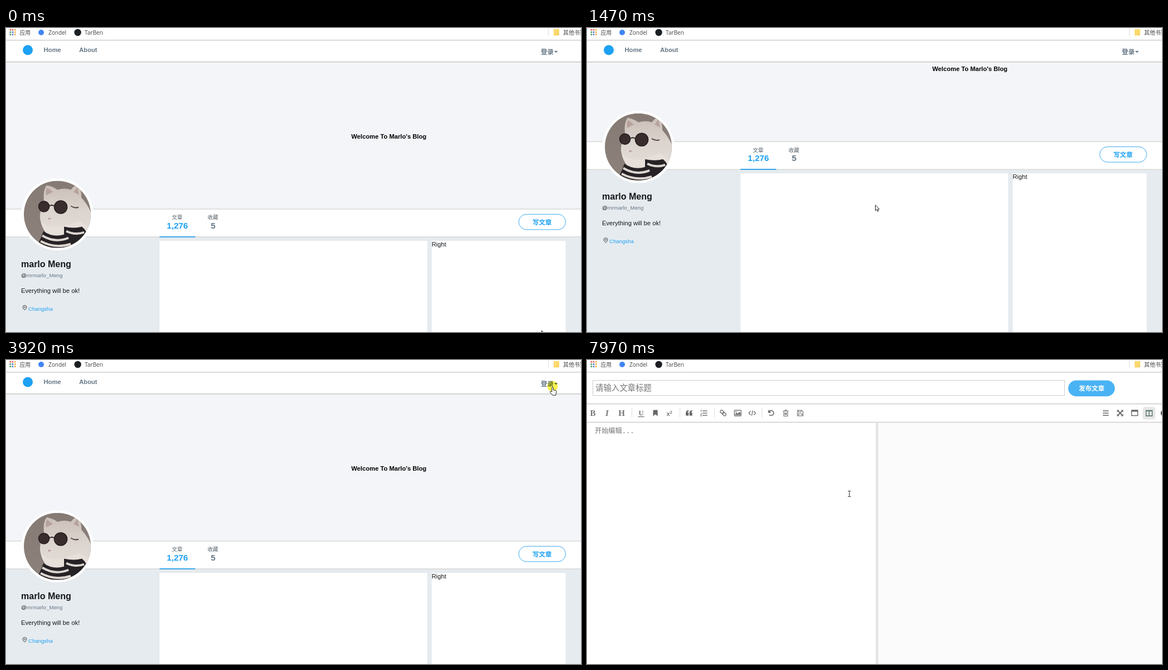
Recreate the animation shown at these times as an HTML page. Size 1030 by 544 pixels, loop 8000 ms.

```html
<!DOCTYPE html>
<html lang="zh">
<head>
<meta charset="utf-8">
<title>Blog</title>
<style>
html, body { margin: 0; width: 100%; height: 100%; overflow: hidden; background: #fff; }
svg { display: block; }
text { font-family: "Liberation Sans", Arial, "Noto Sans CJK SC", "Noto Sans CJK", sans-serif; font-size: 11.2px; fill: #14171a; white-space: pre; }
.b { font-weight: 700; }
.mark { font-family: "Open Sans", "Noto Sans CJK SC", "Noto Sans CJK", sans-serif; font-size: 10px; fill: #444; }
.cjk { font-family: "Noto Sans CJK SC", "Noto Sans CJK", sans-serif; }
.gray { fill: #657786; }
.blue { fill: #1da1f2; }
.hint { fill: #757575; }
.s { font-size: 9.6px; }
.num { font-size: 15.2px; font-weight: 700; text-anchor: middle; }
.serif { font-family: "Liberation Serif", Tinos, serif; font-weight: 700; font-size: 15px; fill: #757575; text-anchor: middle; }
.line { fill: none; stroke: #757575; stroke-width: 1.4; }
.ptr { fill: #fff; stroke: #222; stroke-width: 1; stroke-linejoin: round; }
#press { mix-blend-mode: multiply; }
</style>
</head>
<body>
<svg width="1030" height="544" viewBox="0 0 1030 544">
<defs>
  <clipPath id="round"><circle r="60"/></clipPath>
  <linearGradient id="wall" x2="0" y2="1"><stop stop-color="#857a74"/><stop offset="1" stop-color="#8c817b"/></linearGradient>
  <linearGradient id="fur" x2="0" y2="1"><stop stop-color="#c9beb7"/><stop offset=".5" stop-color="#dcd4ce"/><stop offset="1" stop-color="#e4ddd8"/></linearGradient>
  <filter id="soft" x="-10%" y="-10%" width="120%" height="120%"><feDropShadow dx="0" dy="1" stdDeviation="1.2" flood-opacity=".28"/></filter>
  <g id="cat" clip-path="url(#round)">
    <rect x="-60" y="-60" width="120" height="120" fill="url(#wall)"/>
    <path d="M-24-24Q-26-44-19-52Q-8-50 0-44Q14-48 24-44Q32-54 38-54Q43-44 43-30Q54-18 60-4V36L6 40Q-22 30-30 12Q-34 0-24-24Z" fill="url(#fur)"/>
    <path d="M-20-34Q-22-44-18-48L-8-40ZM29-40L36-49L39-35Z" fill="#b5a39c"/>
    <path d="M-30 12Q-16 26 8 22L40 12L60 26V42H-10Q-26 32-30 12Z" fill="#e6dfda"/>
    <path d="M-17 6l6 1-4 3z" fill="#b39a93"/>
    <path d="M24-15q8 5 14 2" fill="none" stroke="#5b4c48" stroke-width="2"/>
    <path d="M12 22Q30 26 44 22Q54 30 54 42L48 60H-38Q-30 44-25 30Q-8 42 12 36Z" fill="#262225"/>
    <path d="M-27 38Q-4 52 20 42M-30 48Q-4 62 24 53M16 30Q32 38 48 32" fill="none" stroke="#ddd6d1" stroke-width="4"/>
    <g fill="#3a2d2e" stroke="#241b1c" stroke-width="1.5"><circle cx="-24" cy="-14" r="9.5"/><circle cx="6" cy="-13" r="11.5"/></g>
    <path d="M-14-15q4-3 8 0" fill="none" stroke="#30282a" stroke-width="2"/>
  </g>
  <g id="face"><circle r="64.5" fill="#fff"/><use href="#cat"/></g>
</defs>

<g id="page">
  <rect y="61" width="1030" height="483" fill="#f3f5f8"/>
  <text id="hello" class="b" style="fill:#000" x="618.5" y="198">Welcome To Marlo's Blog</text>
  <rect id="ground" width="1030" height="600" fill="#e6ebef"/>
  <g id="flow"><g id="view">
    <rect x="275" y="381" width="479.5" height="800" fill="#fff"/>
    <rect x="762.5" y="381" width="240" height="800" fill="#fff"/>
    <text x="762.5" y="391">Right</text>
    <text class="b" style="font-size:16px" x="27" y="428">marlo Meng</text>
    <text class="s gray" x="27" y="446"><tspan fill="#14171a">@</tspan>mrmarlo_Meng</text>
    <text x="27" y="474">Everything will be ok!</text>
    <path d="M33.5 505Q30 501.5 30 499.8A3.5 3.5 0 0 1 37 499.8Q37 501.5 33.5 505Z" fill="none" stroke="#444"/>
    <circle cx="33.5" cy="499.8" r="1.2" fill="none" stroke="#444" stroke-width=".8"/>
    <text class="s blue" x="40" y="505.5">Changsha</text>
  </g></g>
  <rect id="strip" y="61" width="1030" height="24" fill="#f3f5f8"/>
  <use id="faceLow" href="#face"/>
  <g id="bar">
    <rect width="1030" height="50" fill="#fff"/>
    <path d="M0 0H1030M0 49.8H1030" stroke="#c8c8c8"/>
    <g id="mini">
      <use href="#cat" transform="translate(47.5 26) scale(.333)"/>
      <text class="b" style="font-size:13.5px" x="75" y="21">Marlo Meng</text>
      <text class="blue" style="font-size:12px" x="75" y="39.5">@mrmarlo_meng</text>
    </g>
    <text class="s cjk" style="fill:#55606a" x="297" y="18.4">文章</text>
    <text id="n0" class="num" x="307" y="35">1,276</text>
    <text class="s cjk" style="fill:#55606a" x="361" y="18.4">收藏</text>
    <text id="n1" class="num" x="371" y="35">5</text>
    <rect id="u0" x="275" y="48.8" width="64" height="1.7" fill="#1d9bea"/>
    <rect id="u1" x="339" y="48.8" width="64" height="1.7" fill="#1d9bea"/>
    <rect x="918.5" y="9.3" width="84" height="27.5" rx="13.7" fill="#fff" stroke="#3fabee"/>
    <text class="b cjk blue" style="font-size:11.5px" x="943" y="27.5">写文章</text>
  </g>
  <use id="faceTop" href="#face"/>
  <rect y="22" width="1030" height="38" fill="#fff"/>
  <path d="M0 60.5H1030" stroke="#c4c4c4"/><path d="M0 61.5H1030" stroke="#e2e3e4"/>
  <circle cx="39" cy="39.5" r="9" fill="#1da1f2"/>
  <text class="b gray" x="67.5" y="42.6">Home</text>
  <text class="b gray" x="131" y="42.6">About</text>
  <text class="b cjk gray" style="font-size:11.6px" x="958" y="47">登录</text>
  <path d="M982 41h6.5l-3.25 3.5z" fill="#657786"/>
  <g id="login">
    <rect x="793" y="63" width="209" height="145" rx="3" fill="#fff" stroke="#d8d8d8" filter="url(#soft)"/>
    <path d="M968 64L977 58L986 64Z" fill="#fff"/>
    <rect id="user" x="806" y="80" width="185" height="24" rx="1" fill="#fff" stroke="#ccc"/>
    <text class="hint" x="810.5" y="95.5">username</text>
    <rect x="806" y="121" width="185" height="24" rx="1" fill="#fff" stroke="#ccc"/>
    <text class="hint" x="810.5" y="136.5">password</text>
    <rect x="818" y="159.5" width="160" height="28" rx="14" fill="#1da1f2"/>
    <text class="b" style="fill:#fff" x="881" y="177">Log in</text>
  </g>
</g>

<g id="editor">
  <rect y="22" width="1030" height="522" fill="#fff"/>
  <rect x="10.5" y="36.5" width="845" height="27" fill="#fff" stroke="#ccc"/>
  <text class="cjk hint" style="font-size:14.4px" x="15" y="54.8">请输入文章标题</text>
  <rect x="862" y="36.5" width="83.5" height="28.5" rx="14.2" fill="#4ab3f4"/>
  <text class="b cjk" style="font-size:11.5px;fill:#fff" x="881" y="55.2">发布文章</text>
  <rect x="521" y="112" width="509" height="432" fill="#fbfbfb"/>
  <rect x="517.5" y="112" width="4" height="432" fill="#e1e1e1"/>
  <path d="M0 78.5H1030M0 111.5H1030" stroke="#cfcfcf"/>
  <path d="M0 79.5H1030M0 112.5H1030M0 77.5H1030M0 110.5H1030" stroke="#efefef"/>
  <path d="M80.5 85v18M166.5 85v18M228.5 85v18M313.5 85v18" stroke="#ddd"/>
  <text class="serif" x="10.5" y="100">B</text>
  <text class="serif" style="font-style:italic" x="36" y="100">I</text>
  <text class="serif" x="62" y="100">H</text>
  <text class="serif" style="font-size:13px" x="97" y="99">U</text>
  <path class="line" d="M91.5 101.5h11"/>
  <path d="M118.5 89.5h8v11l-4-3.5-4 3.5z" fill="#666"/>
  <text class="b" style="font-size:11px;fill:#757575" x="142.5" y="100">x<tspan dy="-4" font-size="7">2</tspan></text>
  <g fill="#666"><path id="q" d="M177 95q0-5 5-5v2q-2 0-2 2h2v5.5h-5z"/><use href="#q" x="6.5"/></g>
  <path class="line" d="M207 91h8.5M207 95h8.5M207 99h8.5"/>
  <path d="M204.5 89v4M203.3 96h2.4l-2.4 4h2.6" fill="none" stroke="#757575"/>
  <g class="line" transform="rotate(45 244 95)"><rect x="237.5" y="92.5" width="7" height="5" rx="2.5"/><rect x="243" y="92.5" width="7" height="5" rx="2.5"/></g>
  <rect class="line" x="264" y="90" width="12" height="10" rx="1"/>
  <path d="M265.5 98.5v-2l2.5-2.5 2 2 3-3.5 2 2.5v3.5z" fill="#757575"/><circle cx="267" cy="92.8" r="1.1" fill="#757575"/>
  <path class="line" d="M293 91.5l-3 3.5 3 3.5M299 91.5l3 3.5-3 3.5M297 90.5l-2 9"/>
  <path class="line" style="stroke-width:1.8" d="M326 92.5A4.5 4.5 0 1 1 326.5 98"/><path d="M324.5 89v5.5h5.5z" fill="#666"/>
  <path class="line" style="stroke-width:1.1" d="M351 91.5h10M352.5 92v8.5h7V92M354.5 91v-1.5h3V91M354.5 94v4.5M356 94v4.5M357.5 94v4.5"/>
  <path class="line" style="stroke-width:1.2" d="M377 90h7.5l2.5 2.5v7.5h-10zM379 90v3h4.5v-3M379 100v-4h6v4"/>
  <path class="line" style="stroke:#666;stroke-width:1.7" d="M924 91h10.5M924 95h10.5M924 99h10.5"/>
  <path class="line" style="stroke:#666;stroke-width:1.8" d="M951 91l8 8M959 91l-8 8"/>
  <path d="M949.5 89.5h4l-4 4zM960.5 89.5v4l-4-4zM949.5 100.5v-4l4 4zM960.5 100.5h-4l4-4z" fill="#666"/>
  <rect class="line" style="stroke:#666" x="975.5" y="90" width="11" height="9.5"/><path d="M975 89.5h12v3h-12z" fill="#666"/>
  <rect x="995.5" y="84" width="22.5" height="22.5" rx="4" fill="#e6e6e6"/>
  <path class="line" style="stroke:#4f6f64;stroke-width:1.3" d="M1001.5 90.5h11v9.5h-11zM1007 90v10M1001 91h12"/>
  <circle cx="1033" cy="95" r="5.5" fill="#666"/>
  <text class="cjk hint" style="font-size:12.2px" x="14" y="130.8">开始编辑<tspan font-family="Liberation Mono, monospace" font-size="12">...</tspan></text>
</g>

<rect width="1030" height="22" fill="#fff"/>
<path d="M0 21.8H1030" stroke="#cfcfcf" stroke-width="1.4"/>
<g id="apps"></g>
<text class="mark" style="font-size:9.7px" x="24.5" y="11.6">应用</text>
<circle cx="63" cy="8" r="5" fill="#4285f4"/>
<text class="mark" x="76" y="11.6">Zondel</text>
<circle cx="128.5" cy="8" r="6.2" fill="#1b1f23"/>
<text class="mark" x="141" y="11.6">TarBen</text>
<path d="M971.5 1v13" stroke="#ddd"/>
<path d="M981 2h10v9l-2.5 2.5H981z" fill="#fbd96c"/><path d="M988.5 13.5V11H991z" fill="#d9a93a"/>
<text class="mark" style="font-size:9.9px" x="998" y="11.6">其他书签</text>

<circle id="press" r="9.5" fill="#f8f23c" fill-opacity=".9"/>
<g id="cursor">
  <path id="arrow" class="ptr" d="M.5 .5V10.5L2.9 8.3L4.5 12L6.2 11.2L4.6 7.8H7.5Z"/>
  <path id="hand" class="ptr" d="M-1.2 9V1.2Q0-.8 1.3 1.2V5.5L6 6.5Q7.2 7 7 9L6 12.5V15H0L-4.5 9.5Q-4.5 7.5-2.8 8Z"/>
  <path id="beam" d="M-2.5-5H-.5L0-4.5L.5-5H2.5M0-4.5V4.5M-2.5 5H-.5L0 4.5L.5 5H2.5" fill="none" stroke="#222"/>
</g>
</svg>
<script>
const LOOP = 8000;
const $ = id => document.getElementById(id);
const set = (id, name, value) => $(id).setAttribute(name, value);
const show = (id, on) => { $(id).style.display = on ? "" : "none"; };
const move = (id, x, y) => set(id, "transform", `translate(${x} ${y})`);
const within = (t, a, b) => t >= a && t < b;

const SCROLL = [[110, 0], [820, 400], [1080, 400], [1640, 0]];
const FADE = [[2100, 1], [2180, .25], [2240, 0], [2300, 0], [2560, 1]];
const OPEN = [[4000, 0], [4120, 1], [5660, 1], [5780, 0]];
const EDIT = [[6860, 0], [7040, 1]];
const PATH = [
  [0, 959, 541], [70, 959, 541], [450, 800, 390], [820, 692, 273], [1080, 692, 273],
  [1640, 440, 335], [1790, 424, 342], [1940, 370, 339], [2680, 370, 339],
  [2900, 540, 290], [3200, 860, 165], [3400, 1012, 90], [3520, 999, 64], [3720, 979, 48],
  [4060, 979, 48], [4310, 905, 92], [4640, 890, 94], [4980, 891, 170], [5200, 891, 170],
  [5520, 926, 224], [5780, 930, 230], [6010, 945, 233], [6330, 975, 321],
  [6600, 975, 321], [6780, 970, 336], [7320, 970, 336], [7620, 760, 290], [7920, 470, 239.5]
];

// Values of a step table at time t, linear between rows.
function at(table, t) {
  const i = table.findIndex(row => row[0] > t);
  if (i === 0) return table[0].slice(1);
  if (i < 0) return table[table.length - 1].slice(1);
  const a = table[i - 1], b = table[i], k = (t - a[0]) / (b[0] - a[0]);
  return a.slice(1).map((v, j) => v + (b[j + 1] - v) * k);
}

function pointer(t, x) {
  if (within(t, 1870, 2740) || within(t, 3600, 4100) || within(t, 4860, 5280) || within(t, 6740, 6960)) return "hand";
  if (within(t, 4260, 4780) || (t > 7000 && x < 518)) return "beam";
  return "arrow";
}

function tab(i, on) {
  show("u" + i, on);
  $("n" + i).style.fill = on ? "#1da1f2" : "#657786";
}

function draw(t) {
  const [scroll] = at(SCROLL, t), pinned = scroll >= 240;
  const barY = Math.max(84, 324 - scroll);
  move("hello", 0, -scroll);
  move("flow", 0, -scroll);
  move("bar", 0, barY);
  set("ground", "y", barY + 50);
  for (const id of ["faceLow", "faceTop"]) move(id, 92, 333.5 - scroll);
  show("faceTop", !pinned);
  show("strip", pinned);
  show("mini", pinned);
  set("view", "opacity", at(FADE, t)[0]);

  const saved = within(t, 2100, 2760);
  tab(0, !saved);
  tab(1, saved || within(t, 1870, 2100));

  const open = at(OPEN, t)[0], edit = at(EDIT, t)[0];
  set("login", "opacity", open);
  show("login", open > 0);
  set("user", "stroke", within(t, 4520, 5660) ? "#7cc4f2" : "#ccc");
  set("editor", "opacity", edit);
  show("editor", edit > 0);
  show("page", edit < 1);

  const [x, y] = at(PATH, t), kind = pointer(t, x);
  move("cursor", x, y);
  move("press", x, y - 1);
  show("press", within(t, 3860, 4000));
  for (const id of ["arrow", "hand", "beam"]) show(id, id === kind);
  $("hand").style.stroke = within(t, 2100, 2300) ? "#23813a" : "#222";
}

const dots = ["#e2574c", "#e2574c", "#f0a93b", "#4a9b5e", "#4878c8", "#f0a93b", "#4a9b5e", "#4878c8", "#f0a93b"];
$("apps").innerHTML = dots.map((c, i) =>
  `<rect x="${6.5 + i % 3 * 4.2}" y="${2 + Math.floor(i / 3) * 4.2}" width="2.6" height="2.6" fill="${c}"/>`).join("");

const start = performance.now();
function tick() {
  draw((performance.now() - start) % LOOP);
  requestAnimationFrame(tick);
}
tick();
</script>
</body>
</html>
```
